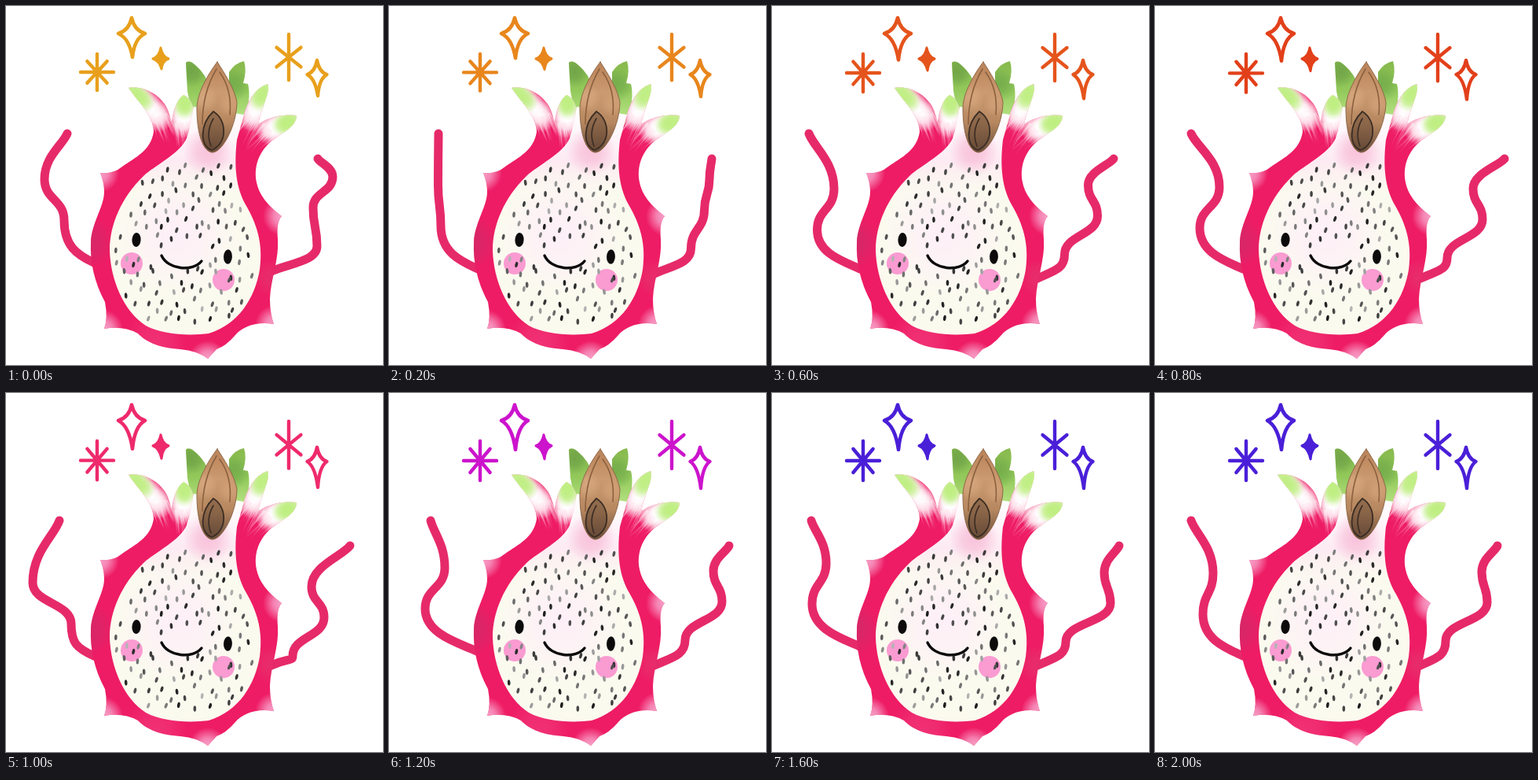
These frames come from a looping animation (480x456 px, 2200 ms). An HTML page with a canvas:

```html
<!DOCTYPE html>
<html lang="en">
<head>
<meta charset="utf-8">
<title>Dancing dragon fruit</title>
<style>
html, body { margin: 0; width: 100%; height: 100%; overflow: hidden; background: #fff; }
canvas { display: block; }
</style>
</head>
<body>
<canvas id="stage" width="480" height="456"></canvas>
<script>
const W = 480, H = 456, STEP = 200;
const ctx = document.getElementById('stage').getContext('2d');

const SPARK = ['#e8a01c', '#e8861c', '#e86a1c', '#e5541c', '#e2401a', '#ee2a6c',
  '#cc14cc', '#8a1ad2', '#4a1fd8', '#4a1fd8', '#4a1fd8'];

// Each arm bends at set heights. A pose holds the drop of the bends,
// then x of the hand and of every bend.
const LEFT = {
  handY: 162, bends: [228, 280], shoulder: [112, 334], side: -1,
  poses: {
    0: [-8, 78, 49, 74], 2: [7, 48, 76, 58], 4: [2, 46, 82, 57], 5: [13, 68, 34, 83],
    6: [-6, 53, 71, 46], 7: [-9, 34, 68, 48], 8: [-12, 50, 69, 51], 10: [1, 46, 74, 61]
  }
};
const RIGHT = {
  handY: 194, bends: [226, 265, 314], shoulder: [338, 346], side: 1,
  poses: {
    0: [-9, 397, 416, 391, 396], 2: [-3, 425, 400, 412, 373], 4: [6, 445, 405, 417, 372],
    5: [20, 438, 389, 405, 365], 6: [0, 433, 413, 424, 377], 8: [2, 442, 423, 431, 374],
    9: [2, 454, 420, 427, 372], 10: [1, 436, 416, 423, 370]
  }
};

const BODY = new Path2D('M156 104C172 102 188 108 199 121C206 128 208 138 211 148Q214 122 226 113' +
  'Q236 117 240 135L300 150Q308 108 333 99C337 108 327 125 321 150Q342 136 370 139' +
  'C370 152 354 160 340 170C322 184 315 204 319 224Q323 246 351 267Q344 274 346 296' +
  'C348 322 337 346 336 372Q336 390 341 404C318 400 300 408 292 418Q280 432 268 436L257 448' +
  'Q244 438 222 436C196 434 180 428 168 416Q150 406 125 410Q130 396 126 376' +
  'C112 350 107 325 108 300C109 275 125 255 125 236Q125 224 120 212Q136 214 148 204' +
  'C165 192 184 184 188 160C188 140 170 124 156 104Z');
const FLESH = new Path2D('M239 128Q236 150 230 168C221 188 190 202 175 216C147 243 132 278 132 310' +
  'C133 348 150 388 178 406C200 418 235 419 258 416C297 404 317 370 323 335' +
  'C328 300 318 275 306 254C293 232 290 205 294 170L303 138Z');
const NUT = new Path2D('M269 71C262 80 243 108 243 130C243 155 248 183 262 186' +
  'C276 187 294 150 294 122C291 105 278 85 269 71Z');
const KERNEL = new Path2D('M262 183C246 178 247 150 264 134C281 144 283 174 262 183Z');
const LEAVES = new Path2D('M229 72Q233 68 241 75Q255 87 260 104L255 150Q236 140 231 108Z' +
  'M284 84Q292 72 303 70Q307 82 302 98L308 99Q313 118 302 150L284 160Z');

function mulberry(seed) {
  return () => {
    seed = seed + 0x6D2B79F5 | 0;
    let t = Math.imul(seed ^ seed >>> 15, 1 | seed);
    t = t + Math.imul(t ^ t >>> 7, 61 | t) ^ t;
    return ((t ^ t >>> 14) >>> 0) / 4294967296;
  };
}

const mix = (a, b, t) => a + (b - a) * t;

function linear(c, x0, y0, x1, y1, ...stops) {
  const g = c.createLinearGradient(x0, y0, x1, y1);
  stops.forEach((color, i) => g.addColorStop(i / (stops.length - 1), color));
  return g;
}

// Soft round spot; rgb is "r,g,b".
function glow(c, x, y, r, rgb, alpha = 1) {
  const g = c.createRadialGradient(x, y, 0, x, y, r);
  g.addColorStop(0, `rgba(${rgb},${alpha})`);
  g.addColorStop(0.45, `rgba(${rgb},${alpha * 0.75})`);
  g.addColorStop(1, `rgba(${rgb},0)`);
  c.fillStyle = g;
  c.fillRect(x - r, y - r, 2 * r, 2 * r);
}

function oval(c, x, y, rx, ry, color, tilt = 0) {
  c.fillStyle = color;
  c.beginPath();
  c.ellipse(x, y, rx, ry, tilt, 0, 7);
  c.fill();
}

function within(c, path, draw) {
  c.save();
  c.clip(path);
  draw();
  c.restore();
}

function strokePath(c, d, color, width) {
  c.strokeStyle = color;
  c.lineWidth = width;
  c.stroke(typeof d === 'string' ? new Path2D(d) : d);
}

// Green tip fading through white into hairs that point at the belly.
function paintTip(c, rand, x0, y0, x1, y1) {
  const angle = Math.atan2(260 - y1, 240 - x1);
  for (let t = 0; t <= 1; t += 0.25) glow(c, mix(x0, x1, t), mix(y0, y1, t), 20, '255,255,255');
  for (let i = 0; i < 24; i++) {
    const off = (rand() - 0.5) * 24, a = angle + (rand() - 0.5) * 0.3;
    const x = x1 - Math.sin(angle) * off, y = y1 + Math.cos(angle) * off;
    const length = mix(18, 42, rand());
    const x2 = x + Math.cos(a) * length, y2 = y + Math.sin(a) * length;
    const fade = linear(c, x, y, x2, y2, 'rgba(255,235,243,.75)', 'rgba(255,190,214,0)');
    strokePath(c, `M${x} ${y}L${x2} ${y2}`, fade, 1);
  }
  for (let t = 0; t < 0.5; t += 0.15) glow(c, mix(x0, x1, t), mix(y0, y1, t), 15, '190,238,128', 0.8);
}

function paintRind(c, rand) {
  c.fillStyle = '#ee1c64';
  c.fill(BODY);
  within(c, BODY, () => {
    glow(c, 104, 300, 34, '190,50,105', 0.5);
    glow(c, 338, 345, 24, '225,60,115', 0.5);
    glow(c, 190, 428, 40, '244,80,140', 0.4);
    for (const [x, y] of [[119, 212], [352, 267], [342, 405], [124, 411], [257, 450]])
      glow(c, x, y, 25, '248,180,215', 0.9);
    paintTip(c, rand, 160, 106, 194, 140);
    paintTip(c, rand, 228, 115, 226, 148);
    paintTip(c, rand, 330, 103, 314, 140);
    paintTip(c, rand, 365, 146, 337, 157);
  });
}

function paintFlesh(c) {
  c.fillStyle = linear(c, 0, 120, 0, 235, '#ffffff', '#fff8fb', '#fdeaf2', '#fbfaef');
  c.fill(FLESH);
  within(c, FLESH, () => {
    glow(c, 257, 184, 32, '246,176,208', 0.7);
    glow(c, 218, 290, 75, '254,238,248', 0.9);
  });
}

function paintNut(c) {
  c.fillStyle = linear(c, 0, 71, 0, 186, '#b98259', '#cb9a70', '#b78860', '#6a4d3b');
  c.fill(NUT);
  within(c, NUT, () => {
    glow(c, 252, 118, 18, '232,186,144', 0.4);
    glow(c, 285, 125, 16, '222,172,130', 0.5);
    strokePath(c, 'M268 80Q250 110 250 150M272 84Q288 106 285 138', '#8b603f', 1.6);
  });
  strokePath(c, NUT, '#8f6848', 1);
  c.fillStyle = 'rgba(92,66,48,.45)';
  c.fill(KERNEL);
  strokePath(c, KERNEL, '#3b2d24', 1.8);
  strokePath(c, 'M261 178Q254 160 264 143', '#3a2c24', 1.6);
}

// Staggered, jittered rows that keep clear of the eyes and the mouth.
function paintSeeds(c, rand) {
  const inside = (x, y) => c.isPointInPath(FLESH, x, y);
  const onFace = (x, y) => Math.hypot(x - 166, y - 297) < 15 ||
    Math.hypot(x - 282, y - 318) < 15 || Math.hypot((x - 224) / 34, (y - 320) / 17) < 1;
  for (let row = 0; row < 19; row++) {
    for (let x = 130 + row % 2 * 10; x < 330; x += 20) {
      const sx = x + (rand() - 0.5) * 9, sy = 204 + row * 11.4 + (rand() - 0.5) * 9;
      const shade = Math.floor(30 + 150 * rand() ** 1.3);
      const tilt = 0.1 + (rand() - 0.5) * 0.6;
      if (!inside(sx - 6, sy) || !inside(sx + 6, sy) || !inside(sx, sy + 7) || onFace(sx, sy)) continue;
      oval(c, sx, sy, 1.8, 3.7, `rgb(${shade},${shade},${shade})`, tilt);
    }
  }
}

function paintFace(c, rand) {
  oval(c, 160, 327, 14, 14, '#fa9bd2');
  oval(c, 277, 348, 14, 14, '#fa9bd2');
  paintSeeds(c, rand);
  oval(c, 166, 297, 5.6, 9, '#0c0a0b', 0.05);
  oval(c, 282.5, 318.5, 5.4, 9.2, '#0c0a0b', 0.05);
  strokePath(c, 'M198 317C206 335 238 338 249 324', '#0c0a0b', 3.4);
}

function paintFruit() {
  const layer = document.createElement('canvas');
  layer.width = W;
  layer.height = H;
  const c = layer.getContext('2d');
  const rand = mulberry(11);
  c.lineCap = c.lineJoin = 'round';
  c.fillStyle = linear(c, 0, 70, 0, 145, '#87b94d', '#93c95b', '#b9e587');
  c.fill(LEAVES);
  within(c, LEAVES, () => {
    glow(c, 236, 84, 20, '88,140,62', 0.5);
    glow(c, 289, 100, 22, '90,150,64', 0.5);
  });
  paintRind(c, rand);
  paintFlesh(c);
  paintNut(c);
  paintFace(c, rand);
  return layer;
}

// Steps without a pose lie halfway between their neighbours.
function poseAt(poses, step) {
  return poses[step] || poses[step - 1].map((v, i) => mix(v, poses[step + 1][i], 0.5));
}

function drawArm({ handY, bends, shoulder, side, poses }, step) {
  const [drop, handX, ...xs] = poseAt(poses, step);
  const endX = shoulder[0], endY = shoulder[1] + Math.min(0, drop);
  let x = handX, y = handY;
  ctx.beginPath();
  ctx.moveTo(x, y);
  xs.forEach((bx, i) => {
    const by = bends[i] + drop, half = (by - y) / 2;
    const lead = i ? 0 : (bx - x) * 0.2;
    ctx.bezierCurveTo(x + lead, y + (i ? half : half * 0.5), bx, by - half, bx, by);
    [x, y] = [bx, by];
  });
  ctx.bezierCurveTo(x, mix(y, endY, 0.6), endX + side * 22, endY - 10, endX, endY);
  ctx.strokeStyle = '#e62a69';
  ctx.lineWidth = 11;
  ctx.stroke();
}

// Four-pointed star with concave sides and a longer lower tip.
function drawStar(x, y, wide, up, down, width, fill) {
  const tips = [[x, y - up], [x + wide, y], [x + 1, y + down], [x - wide, y]];
  ctx.beginPath();
  ctx.moveTo(...tips[0]);
  tips.forEach((a, i) => {
    const b = tips[(i + 1) % 4];
    ctx.quadraticCurveTo(mix(x, (a[0] + b[0]) / 2, 0.4), mix(y, (a[1] + b[1]) / 2, 0.4), ...b);
  });
  ctx.closePath();
  ctx.lineWidth = width;
  ctx.stroke();
  if (fill) ctx.fill();
}

function drawRays(x, y, lines, rx, ry) {
  ctx.beginPath();
  for (let i = 0; i < lines; i++) {
    const a = Math.PI * (0.5 + i / lines);
    const k = Math.abs(Math.sin(2 * a)) > 0.1 ? 0.85 : 1;
    const dx = Math.cos(a) * rx * k, dy = Math.sin(a) * ry * k;
    ctx.moveTo(x - dx, y - dy);
    ctx.lineTo(x + dx, y + dy);
  }
  ctx.lineWidth = 4.4;
  ctx.stroke();
}

function drawSparks(step) {
  const grow = Math.min(1, step / 6);
  ctx.strokeStyle = ctx.fillStyle = SPARK[step];
  drawRays(116, 84 + 2 * grow, 4, 21, 23 + 2 * grow);
  drawRays(360, 65 + grow, 3, 21, 29 + grow);
  drawStar(160, 35, 17, 20, 30 + 7 * grow, 4.6);
  drawStar(197, 67, 10, 14, 13 + 4 * grow, 3, true);
  drawStar(396, 87, 12.5, 18, 27 + 7 * grow, 4.4);
}

const fruit = paintFruit();
ctx.lineCap = ctx.lineJoin = 'round';
let shown = -1;

function draw() {
  const step = Math.floor(performance.now() / STEP) % SPARK.length;
  if (step !== shown) {
    shown = step;
    ctx.fillStyle = '#fff';
    ctx.fillRect(0, 0, W, H);
    drawSparks(step);
    drawArm(LEFT, step);
    drawArm(RIGHT, step);
    ctx.drawImage(fruit, 0, 0);
  }
  requestAnimationFrame(draw);
}
draw();
</script>
</body>
</html>
```
